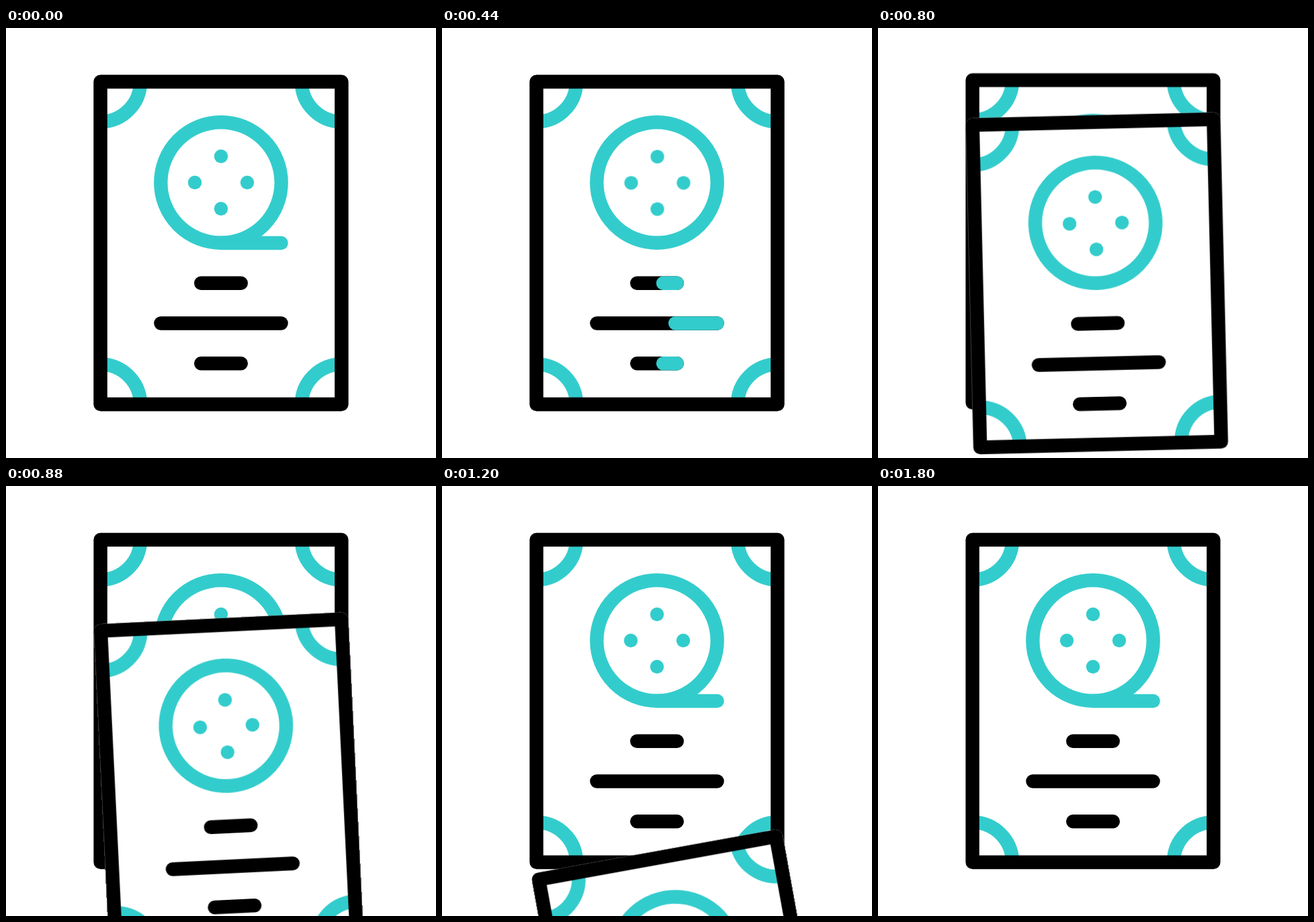
Write an HTML page without scripts that moves like this. It is 640 px wide and 640 px high and loops after 2000 ms.

```html
<!DOCTYPE html>
<html lang="en">
<head>
<meta charset="utf-8">
<title>Film poster</title>
<style>
  @property --start { syntax: "<number>"; inherits: true; initial-value: 0; }
  @property --end { syntax: "<number>"; inherits: true; initial-value: 0; }

  :root {
    --teal: #33cccc;
    --ease: cubic-bezier(.3333, 0, .6667, 1);
  }
  html, body { margin: 0; width: 100%; height: 100%; overflow: hidden; background: #fff; }
  svg { display: block; width: 100%; height: 100%; }

  .line { fill: none; stroke: #000; stroke-width: 20.4; stroke-linecap: round; stroke-linejoin: round; }
  .teal { stroke: var(--teal); }
  .arc { stroke-linecap: butt; }
  .dots { fill: var(--teal); }

  .stack, .front, .spin, .reel-in, .sweep {
    animation: 2s var(--ease) infinite;
  }
  .stack { animation-name: jolt; }
  .front { animation-name: fall; transform-origin: 320px 320px; }
  .spin { animation-name: spin; transform-origin: 320.25px 230.25px; }
  .reel-in { animation-name: reel-in; stroke-dasharray: 100 200; }
  .sweep { animation-name: sweep-start, sweep-end, sweep-show; }
  .late { animation-delay: -.8s; }
  .run {
    stroke-dasharray: calc((var(--end) - var(--start)) * 1px) 300px;
    stroke-dashoffset: calc(var(--start) * -1px);
  }

  /* the whole stack jerks before the front card drops */
  @keyframes jolt {
    0%, 25% { transform: translateY(0); }
    30% { transform: translateY(-12px); }
    34% { transform: translateY(8.9px); }
    38% { transform: translateY(-5px); }
    42%, 100% { transform: translateY(0); }
  }
  @keyframes fall {
    0%, 31.65% { transform: translate(0, 0) rotate(0deg); }
    76.3%, 100% { transform: translate(62px, 672px) rotate(-14.7deg); }
  }
  @keyframes spin {
    0%, 5% { transform: rotate(0deg); }
    20%, 100% { transform: rotate(180deg); }
  }
  @keyframes reel-in {
    0%, 5% { stroke-dashoffset: 0; }
    20%, 100% { stroke-dashoffset: 100; }
  }
  @keyframes sweep-start {
    0%, 10% { --start: 0; }
    30%, 100% { --start: 100; }
  }
  @keyframes sweep-end {
    0%, 5% { --end: 0; }
    20%, 100% { --end: 100; }
  }
  @keyframes sweep-show {
    0% { opacity: 0; animation-timing-function: step-end; }
    5% { opacity: 1; animation-timing-function: step-end; }
    30%, 100% { opacity: 0; }
  }
</style>
</head>
<body>
<svg viewBox="0 0 640 640">
  <defs>
    <path id="corner" class="line teal arc" d="M200 80A59.5 59.5 0 0 1 140.6 139.5"/>
    <g id="top-corners">
      <use href="#corner"/>
      <use href="#corner" transform="matrix(-1 0 0 1 640 0)"/>
    </g>
    <g id="card">
      <rect x="130.4" y="69.8" width="379.2" height="500.4" rx="10.2" fill="#fff"/>
      <use href="#top-corners"/>
      <use href="#top-corners" transform="matrix(1 0 0 -1 0 640)"/>
      <rect class="line" x="140.6" y="80" width="358.8" height="480"/>
      <circle class="line teal" cx="320" cy="230" r="89.7"/>
      <g class="line">
        <path d="M290.2 379.8H349.8"/>
        <path d="M230.4 439.5H409.6"/>
        <path d="M290.2 499.2H349.8"/>
      </g>
    </g>
    <g id="dots" class="dots">
      <circle cx="320" cy="191" r="10.2"/>
      <circle cx="359" cy="230" r="10.2"/>
      <circle cx="320" cy="269" r="10.2"/>
      <circle cx="281" cy="230" r="10.2"/>
    </g>
    <path id="tail" class="line teal" pathLength="100" d="M320 320H409.6"/>
    <g id="runs" class="line teal">
      <path class="run" pathLength="100" d="M290.2 379.8H349.8"/>
      <path class="run" pathLength="100" d="M230.4 439.5H409.6"/>
      <path class="run" pathLength="100" d="M290.2 499.2H349.8"/>
    </g>
  </defs>

  <g class="stack">
    <g>
      <use href="#card"/>
      <use href="#dots"/>
      <use href="#tail"/>
      <use class="sweep late" href="#runs"/>
    </g>
    <g class="front">
      <use href="#card"/>
      <g class="spin"><use href="#dots"/></g>
      <use class="reel-in" href="#tail"/>
      <use class="sweep" href="#runs"/>
    </g>
  </g>
</svg>
</body>
</html>
```
